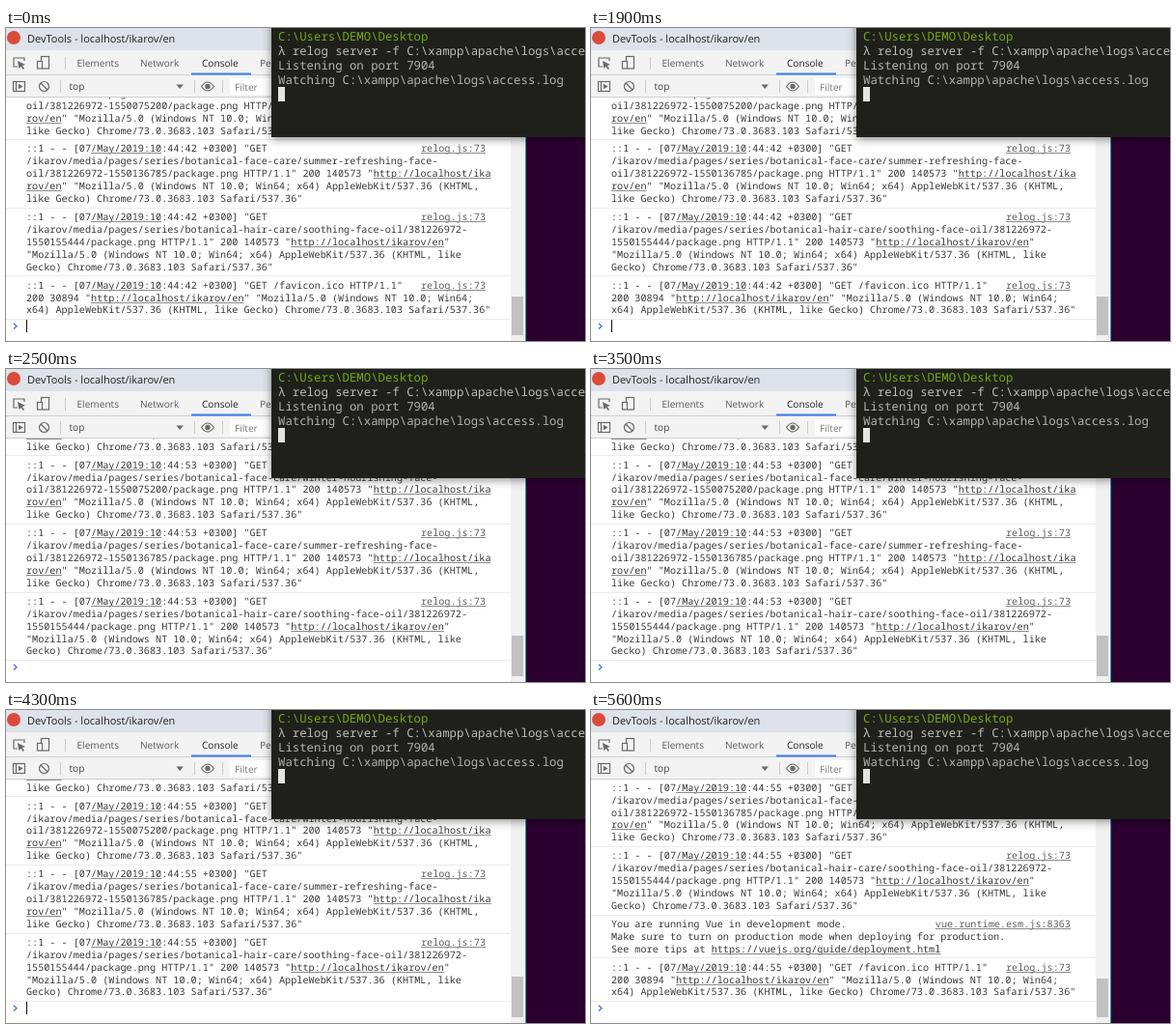
These frames come from a looping animation (600x324 px, 5.7 s). An HTML page with a canvas:

```html
<!DOCTYPE html>
<html lang="en">
<head>
<meta charset="utf-8">
<title>Log console</title>
<style>
  html, body { margin: 0; width: 100%; height: 100%; overflow: hidden; background: #fff; }
  canvas { display: block; width: 600px; height: 324px; }
</style>
</head>
<body>
<canvas id="stage" width="600" height="324"></canvas>
<script>
const ctx = document.getElementById('stage').getContext('2d');
const LOOP = 5700, STEP = 100, BLINK = 530, BLINK_START = 180;
const MONO = '"Noto Sans Mono", monospace';
const UI = '"Open Sans", sans-serif';
const COLS = 79, CHAR = 6.096, LEADING = 12.92, ROW_GAP = 6, BASELINE = 13.2;
const LEFT = 21, TOP = 73, PROMPT_TOP = 301.2, LINK_RIGHT = 497;
const TRACK_LEFT = 523, THUMB_BOTTOM = 318;

// A tilde switches underlining on and off inside log lines.
const PAGE = '"~http://localhost/ikarov/en~"';
const AGENT = '"Mozilla/5.0 (Windows NT 10.0; Win64; x64) AppleWebKit/537.36 ' +
  '(KHTML, like Gecko) Chrome/73.0.3683.103 Safari/537.36"';
const SERIES = '/ikarov/media/pages/series/botanical-';
const plain = s => s.replace(/~/g, '');

function request(first, ...rest) {
  const lines = ['::1 - - [07~/May/2019:10~:44:@ +0300] "GET' + first, ...rest];
  for (const word of AGENT.split(' ')) {
    const joined = lines[lines.length - 1] + ' ' + word;
    if (plain(joined).length <= COLS) lines[lines.length - 1] = joined;
    else lines.push(word);
  }
  return { lines, link: 'relog.js:73' };
}

const asset = (name, size) => request(' /ikarov/build/' + name, `HTTP/1.1" 200 ${size} ${PAGE}`);
const oil = (path, stamp) => request('', SERIES + path,
  `oil/381226972-${stamp}/package.png HTTP/1.1" 200 140573 "~http://localhost/ika~`, '~rov/en~"');
const image = (path, file, size) => request('', path, `${file}HTTP/1.1" 200 ${size} ${PAGE}`);

const START = [
  request(' /ikarov/en HTTP/1.1"', `200 21460 ${PAGE}`),
  asset('vendor.js', 96412),
  asset('main.css', 77878),
  asset('main.js', 320055),
  request('', '/ikarov/media/site/1143059965-1549972526/ikarov.svg HTTP/1.1" 200 3868 "~http://~',
    '~localhost/ikarov/en~"'),
  image(SERIES + 'face-care/1119821194-1550222754/flower.png', '', 486400),
  image(SERIES + 'hair-care/1881669946-', '1550222700/flower_hc.png ', 583521),
  request('', '/ikarov/media/pages/blog/aliquam-est-nibh-pharetra-a-metus-sed-commodo-egestas-',
    'est/-1076832669-1550232874/corwin-pelda-664706-unsplash.png HTTP/1.1" 200', `340724 ${PAGE}`),
  image('/ikarov/media/pages/blog/vestibulum-interdum-sem-non-commodo-pretium/50734875-',
    '1550233894/image-2.2.png ', 829186)
];
const MIDDLE = Array.from({ length: 8 }, (_, i) =>
  oil(`face-care/${['softening', 'balancing', 'refreshing', 'nourishing'][i % 4]}-face-`, 1550041600 + i * 4200));
const END = [
  oil('face-care/winter-nourishing-face-', 1550075200),
  oil('face-care/summer-refreshing-face-', 1550136785),
  image(SERIES + 'hair-care/soothing-face-oil/381226972-', '1550155444/package.png ', 140573)
];
const VUE = {
  lines: ['You are running Vue in development mode.',
    'Make sure to turn on production mode when deploying for production.',
    'See more tips at ~https://vuejs.org/guide/deployment.html~'],
  link: 'vue.runtime.esm.js:8363'
};
const FAVICON = request(' /favicon.ico HTTP/1.1"', `200 30894 ${PAGE}`);
const LOADED = [...START, ...MIDDLE, ...END];

// Start time, visible rows, clock seconds, top of the scrollbar thumb.
const STATES = [
  [0, [...LOADED, FAVICON], 42, 278],
  [2100, [], 53, 0],
  [2200, START.slice(0, 3), 53, 0],
  [2300, START, 53, 205],
  [2400, LOADED.slice(0, 14), 53, 252],
  [2500, LOADED, 53, 276],
  [3800, [], 55, 0],
  [3900, START.slice(0, 3), 55, 0],
  [4000, START.slice(0, 6), 55, 154],
  [4100, START, 55, 205],
  [4200, LOADED.slice(0, 14), 55, 252],
  [4300, LOADED, 55, 276],
  [4400, [...LOADED, VUE, FAVICON], 55, 278]
];

function rect(x, y, w, h, color) {
  ctx.fillStyle = color;
  ctx.fillRect(x, y, w, h);
}

function box(x, y, w, h, color) {
  ctx.strokeStyle = color;
  ctx.strokeRect(x, y, w, h);
}

function text(s, x, y, font, color) {
  ctx.font = font;
  ctx.fillStyle = color;
  ctx.fillText(s, x, y);
}

function path(points, color, fill = false) {
  ctx.beginPath();
  points.forEach(([x, y], i) => i ? ctx.lineTo(x, y) : ctx.moveTo(x, y));
  paint(color, fill);
}

function circle(x, y, r, color, fill = false) {
  ctx.beginPath();
  ctx.arc(x, y, r, 0, Math.PI * 2);
  paint(color, fill);
}

function paint(color, fill) {
  ctx.fillStyle = ctx.strokeStyle = color;
  if (fill) ctx.fill();
  else ctx.stroke();
}

function logLine(line, x, y, color = '#383838') {
  line.split('~').forEach((part, i) => {
    text(part, x, y, '10.16px ' + MONO, color);
    if (i % 2) rect(x, Math.round(y) + 1, part.length * CHAR, 1, '#8a8a8a');
    x += part.length * CHAR;
  });
}

const rowHeight = row => row.lines.length * LEADING + ROW_GAP;

function drawConsole([, rows, seconds, thumb], caret) {
  rect(0, 72, 540, 252, '#fff');
  const total = rows.reduce((sum, row) => sum + rowHeight(row), 0);
  let y = Math.min(TOP, PROMPT_TOP - total);
  for (const row of rows) {
    const h = rowHeight(row);
    if (y + h > 70) {
      row.lines.forEach((line, i) =>
        logLine(line.replace('@', seconds), LEFT, y + BASELINE + i * LEADING));
      logLine(`~${row.link}~`, LINK_RIGHT - row.link.length * CHAR, y + BASELINE, '#5c5c5c');
      rect(0, Math.round(y + h), TRACK_LEFT, 1, '#ececec');
    }
    y += h;
  }
  ctx.lineWidth = 1.4;
  path([[8, y + 4.6], [11, y + 7.5], [8, y + 10.4]], '#3b7ded');
  if (caret) rect(21, Math.round(y) + 1, 1, 13, '#111');
  if (thumb) {
    rect(TRACK_LEFT, 72, 14, 252, '#f1f1f1');
    rect(TRACK_LEFT + 1, thumb, 12, THUMB_BOTTOM - thumb, '#c1c1c1');
  }
}

function drawChrome() {
  rect(0, 0, 540, 23, '#dee2ea');
  circle(8, 10, 7, '#db4b3c', true);
  text('DevTools - localhost/ikarov/en', 22, 14.5, '11px ' + UI, '#222');

  rect(0, 23, 540, 49, '#f3f3f3');
  rect(0, 48, 540, 1, '#cfcfcf');
  rect(0, 71, 540, 1, '#cfcfcf');
  ctx.lineWidth = 1.2;
  const gray = '#6a6a6a';

  path([[12, 40], [8, 40], [8, 31], [19, 31], [19, 34]], gray);
  path([[12, 34], [20, 38], [16.8, 39], [19, 42], [17.7, 43], [15.5, 40], [13.4, 42]], gray, true);
  box(36.5, 29.5, 8, 12.5, gray);
  rect(32, 34, 6, 9, '#f3f3f3');
  box(32.5, 34.5, 5, 7.5, gray);
  rect(61, 30, 1, 13, '#ccc');

  const tabFont = '10.1px ' + UI;
  text('Elements', 73.5, 40, tabFont, '#5a5a5a');
  text('Network', 139, 40, tabFont, '#5a5a5a');
  text('Console', 203, 40, tabFont, '#222');
  text('Performance', 263, 40, tabFont, '#5a5a5a');
  rect(192, 46.5, 62, 2, '#3b7ded');

  box(7.5, 55.5, 12, 10, gray);
  path([[10.5, 55.5], [10.5, 65.5]], gray);
  path([[13, 57.8], [17.5, 60.5], [13, 63.2]], gray, true);
  circle(39.5, 60.5, 5, gray);
  path([[36, 57], [43, 64]], gray);
  rect(56, 54, 1, 13, '#ccc');
  text('top', 65.5, 64, tabFont, '#444');
  path([[176.5, 58.5], [184, 58.5], [180.2, 63]], gray, true);
  rect(195, 54, 1, 13, '#ccc');
  ctx.beginPath();
  ctx.moveTo(202.5, 60.5);
  ctx.quadraticCurveTo(209, 51.5, 215.5, 60.5);
  ctx.quadraticCurveTo(209, 69.5, 202.5, 60.5);
  paint(gray, false);
  circle(209, 60.5, 2.7, gray, true);
  rect(224, 54, 1, 13, '#ccc');
  rect(232, 52, 50, 17, '#fff');
  text('Filter', 237, 65, tabFont, '#777');
}

function drawTerminal() {
  ctx.save();
  ctx.shadowColor = 'rgba(0,0,0,.45)';
  ctx.shadowBlur = 9;
  ctx.shadowOffsetY = 2;
  rect(275, -10, 340, 123, '#1f201c');
  ctx.restore();
  [
    ['C:\\Users\\DEMO\\Desktop', '#78a916'],
    ['λ relog server -f C:\\xampp\\apache\\logs\\access.log', '#bdbdb6'],
    ['Listening on port 7904', '#b4b4ad'],
    ['Watching C:\\xampp\\apache\\logs\\access.log', '#b4b4ad']
  ].forEach(([line, color], i) => text(line, 282, 13.3 + i * 14.75, '12.33px ' + MONO, color));
  rect(282, 61, 7, 15, '#e4e4df');
}

function draw(now) {
  const t = Math.floor((now % LOOP) / STEP) * STEP;
  const caret = Math.abs(Math.floor((t - BLINK_START) / BLINK) % 2) === 1;
  ctx.textRendering = 'geometricPrecision';
  rect(0, 0, 600, 324, '#2b0030');
  drawConsole(STATES.filter(s => s[0] <= t).pop(), caret);
  drawChrome();
  rect(538, 0, 1, 324, '#3f8fc0');
  rect(539, 0, 1, 324, '#1c1626');
  drawTerminal();
}

const origin = performance.now();
function tick() {
  draw(performance.now() - origin);
  requestAnimationFrame(tick);
}
tick();
</script>
</body>
</html>
```
